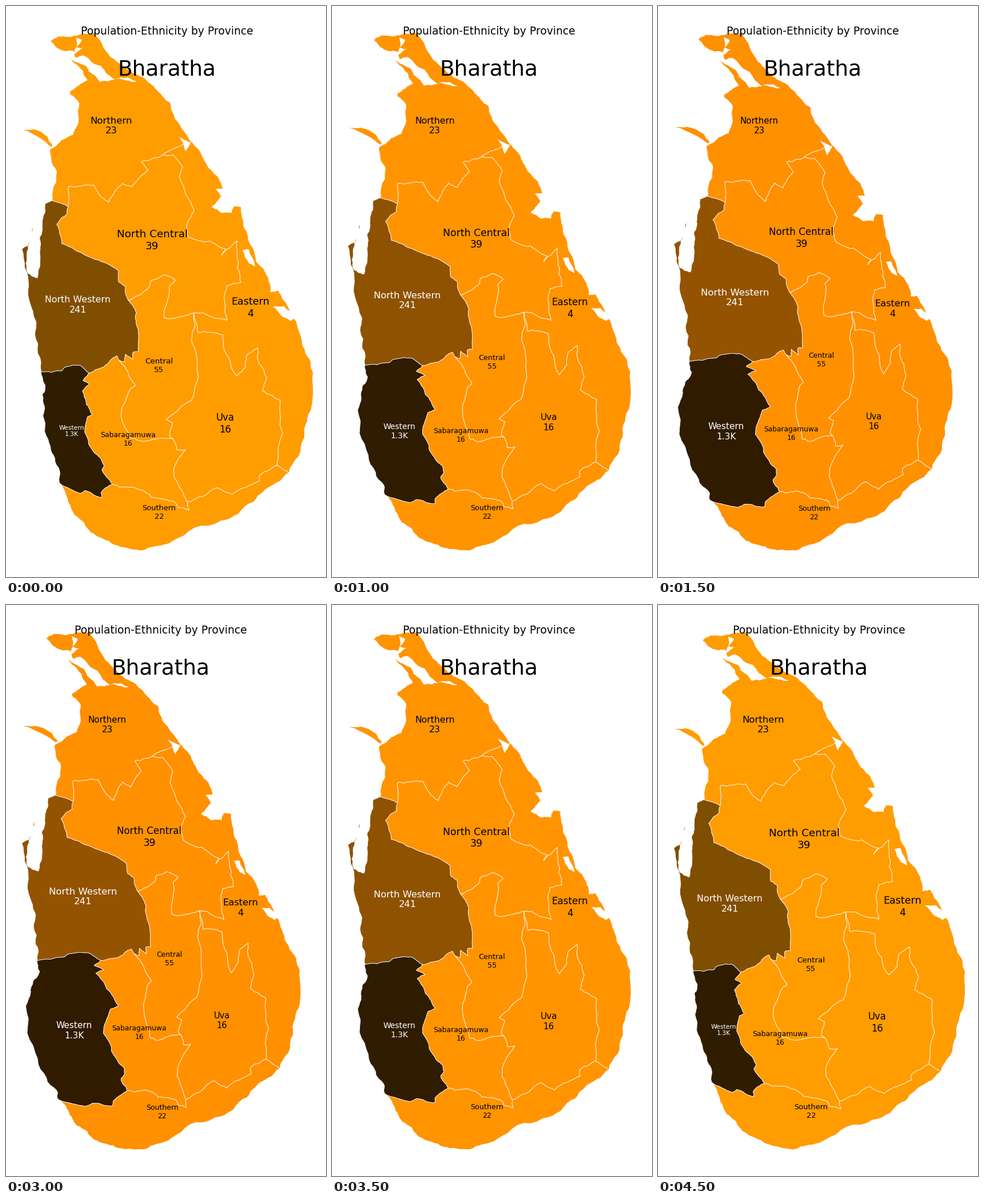
A matplotlib script for the animation above (5 s loop, 560 by 1000 pixels).

```python
import colorsys

import numpy as np
import matplotlib.pyplot as plt
from matplotlib.animation import FuncAnimation

W, H, DPI = 560, 1000, 100
PX = 72 / DPI
LEFT, TOP, BOTTOM = 27.5, 47, 954
STAGES = [0, 1, 2, 3, 4, 4, 3, 2, 1, 0]
rng = np.random.default_rng(4)


def rough(*flat, amount=0.09, levels=3):
    """Line through a few key points, made ragged by shifting midpoints."""
    line = np.array(flat, float).reshape(-1, 2)
    for _ in range(levels):
        a, b = line[:-1], line[1:]
        normal = (b - a)[:, ::-1] * [1, -1]
        out = np.empty((2 * len(line) - 1, 2))
        out[::2] = line
        out[1::2] = (a + b) / 2 + normal * rng.uniform(-amount, amount, (len(a), 1))
        line = out
    return line


def blob(*flat):
    return rough(*flat, *flat[:2], levels=2)


ARCS = {
    # coast
    "n": rough(81,341, 88,308, 88,288, 77,252, 97,235, 117,226, 127,201, 128,171, 112,155,
               113,149, 142,131, 134,114, 112,93, 141,106, 145,115, 164,133, 190,130,
               166,106, 136,88, 122,92, 118,80, 98,79, 78,62, 92,54, 128,51, 155,48,
               183,90, 222,118, 262,146, 287,170, 300,203, 324,238),
    "e": rough(324,238, 342,262, 360,289, 372,302, 379,320, 367,321, 376,334, 360,352,
               376,362, 394,362, 398,350, 411,352, 416,388, 437,447, 458,475, 462,500,
               476,498, 492,525, 508,556, 517,590, 532,622, 534,700, 521,755, 494,816),
    "s": rough(494,816, 470,835, 432,867, 375,900, 290,936, 236,952, 190,942, 148,920,
               120,890, 109,868, 94,834),
    "w": rough(94,834, 94,812, 78,770, 65,716, 68,705, 64,680, 69,665, 62,640),
    "nw": rough(62,640, 51,575, 52,550, 40,490, 28,425, 38,420, 44,407, 37,432, 39,468,
                55,476, 60,446, 59,407, 64,378, 69,346, 81,341),
    # borders
    "nw/n": rough(81,341, 100,347, 109,351),
    "nw/nc": rough(109,351, 107,364, 89,382, 98,416, 130,431, 172,449, 197,464, 197,483,
                   208,490, 214,515),
    "nw/c": rough(214,515, 228,536, 232,575, 232,604, 222,606, 222,618, 209,609, 207,622,
                  198,620),
    "nw/sab": rough(198,620, 194,612, 182,620, 170,632, 145,642),
    "w/nw": rough(62,640, 98,638, 105,631, 128,628, 145,642),
    "w/sab": rough(145,642, 135,655, 146,662, 134,673, 141,697, 151,714, 143,718, 138,745,
                   157,783, 172,803, 168,810, 186,836),
    "w/s": rough(186,836, 167,850, 168,859, 138,847, 130,852, 94,834),
    "n/nc": rough(109,351, 110,316, 154,314, 161,327, 180,344, 204,311, 220,317, 249,288,
                  237,273, 262,266, 274,261),
    "n/e": rough(274,261, 290,251, 324,238),
    "nc/e": rough(274,261, 292,261, 309,283, 303,300, 314,330, 329,359, 315,385, 318,404,
                  356,411, 384,425, 377,436, 404,411, 404,458, 410,484, 386,489, 386,550,
                  345,537, 328,537),
    "nc/c": rough(328,537, 288,547, 276,545, 285,491, 296,480, 276,470, 253,482, 248,495,
                  214,515),
    "sab/c": rough(198,620, 213,640, 226,663, 214,675, 202,705, 217,755, 250,760, 292,757),
    "c/uva": rough(328,537, 324,585, 334,625, 324,690, 280,723, 291,728, 286,752, 292,757),
    "e/uva": rough(328,537, 335,571, 379,575, 383,605, 404,647, 419,632, 420,612, 440,598,
                   442,625, 455,650, 448,673, 479,690, 473,803),
    "e/s": rough(494,816, 473,803),
    "uva/s": rough(473,803, 443,820, 443,830, 395,854, 370,842, 317,867),
    "sab/uva": rough(292,757, 299,776, 314,775, 293,815, 294,825, 317,867),
    "sab/s": rough(317,867, 320,881, 300,876, 296,868, 255,859, 240,847, 186,836),
    # islet, sandbar and lagoons
    "islet": blob(29,217, 48,216, 73,229, 82,244, 80,248, 60,232, 42,222),
    "bar": blob(41,407, 47,386, 44,403),
    "lagoon 1": blob(123,56, 133,60, 122,73, 136,74, 119,85, 124,70),
    "lagoon 2": blob(191,129, 212,126, 229,133, 210,131),
    "lagoon 3": blob(301,228, 323,241, 314,255, 310,242),
    "lagoon 4": blob(413,427, 424,426, 435,456, 424,450),
    "lagoon 5": blob(466,526, 485,525, 505,545, 497,551, 480,541),
    "lagoon 6": blob(58,655, 69,662, 67,677, 60,672),
}

# name, shown value, count, boundary as a walk along arcs ("-" means backwards)
PROVINCES = [
    ("Northern", "23", 23, "n -n/e -n/nc -nw/n"),
    ("North Central", "39", 39, "n/nc nc/e nc/c -nw/nc"),
    ("North Western", "241", 241, "nw nw/n nw/nc nw/c nw/sab -w/nw"),
    ("Eastern", "4", 4, "n/e e e/s -e/uva -nc/e"),
    ("Central", "55", 55, "-nc/c c/uva -sab/c -nw/c"),
    ("Western", "1.3K", 1300, "w/nw w/sab w/s w"),
    ("Sabaragamuwa", "16", 16, "sab/c sab/uva sab/s -w/sab -nw/sab"),
    ("Uva", "16", 16, "e/uva uva/s -sab/uva -c/uva"),
    ("Southern", "22", 22, "s -w/s -sab/s -uva/s -e/s"),
]
COUNTS = np.array([p[2] for p in PROVINCES])


def outline(arcs, walk):
    return np.vstack([arcs[k[1:]][::-1] if k[0] == "-" else arcs[k] for k in walk.split()])


def area_and_centre(poly):
    origin = poly.mean(axis=0)
    p = poly - origin
    q = np.roll(p, -1, axis=0)
    cross = p[:, 0] * q[:, 1] - q[:, 0] * p[:, 1]
    area = cross.sum() / 2
    return abs(area), origin + ((p + q) * cross[:, None]).sum(axis=0) / (6 * area)


def measure(arcs):
    found = [area_and_centre(outline(arcs, p[3])) for p in PROVINCES]
    return np.array([f[0] for f in found]), np.array([f[1] for f in found])


def inflate(arcs):
    """One rubber-sheet cartogram step: areas drift towards the counts."""
    areas, centres = measure(arcs)
    wanted = areas.sum() * COUNTS / COUNTS.sum()
    radius = np.sqrt(areas / np.pi)
    error = np.maximum(areas, wanted) / np.minimum(areas, wanted)
    mass = (np.sqrt(wanted / np.pi) - radius) / (1 + error.mean())

    def push(points):
        offset = points[:, None] - centres
        dist = np.linalg.norm(offset, axis=2)
        rel = dist / radius
        force = mass * np.where(rel > 1, 1 / rel, rel**2 * (4 - 3 * rel))
        return points + (offset * (force / dist)[..., None]).sum(axis=1)

    return {key: push(points) for key, points in arcs.items()}


def fit(arcs):
    """Scale to the fixed height, aligned left."""
    points = np.vstack(list(arcs.values()))
    low = points.min(axis=0)
    scale = (BOTTOM - TOP) / np.ptp(points[:, 1])
    return {key: (p - low) * scale + [LEFT, TOP] for key, p in arcs.items()}


MAPS = [fit(ARCS)]
while len(MAPS) <= max(STAGES):
    MAPS.append(fit(inflate(MAPS[-1])))


def color_of(name, stage):
    t = stage / max(STAGES)
    lightness = {"North Western": 0.25 + 0.05 * t**0.8, "Western": 0.094}.get(name, 0.5)
    return colorsys.hls_to_rgb((36.7 - 3.8 * t) / 360, lightness, 1)


plt.rcParams["font.family"] = "DejaVu Sans"
fig = plt.figure(figsize=(W / DPI, H / DPI), dpi=DPI, facecolor="white")
ax = fig.add_axes([0, 0, 1, 1])
ax.set(xlim=(0, W), ylim=(H, 0))
ax.axis("off")

# patch, walk, province giving the colour
shapes = []
for walk, owner in [("islet", "Northern"), ("bar", "North Western"),
                    *((p[3], p[0]) for p in PROVINCES)]:
    patch, = ax.fill([0], [0], ec="white", lw=0.8 * PX)
    shapes.append((patch, walk, owner))
lagoons = {key: ax.fill([0], [0], fc="white", lw=0, zorder=3)[0]
           for key in ARCS if key.startswith("lagoon")}

labels = [ax.text(0, 0, f"{name}\n{value}", ha="center", va="center", zorder=5,
                  color="white" if name.endswith("Western") else "black")
          for name, value, *_ in PROVINCES]
titles = [ax.text(0, y, text, fontsize=size * PX, ha="center", zorder=5)
          for text, y, size in [("Population-Ethnicity by Province", 49.5, 18.75),
                                ("Bharatha", 121.5, 37.5)]]


def draw(i):
    stage = STAGES[i]
    arcs = MAPS[stage]
    for patch, walk, owner in shapes:
        patch.set_xy(outline(arcs, walk))
        patch.set_facecolor(color_of(owner, stage))
    for key, patch in lagoons.items():
        patch.set_xy(arcs[key])
    areas, centres = measure(arcs)
    for label, area, centre in zip(labels, areas, centres):
        label.set_position(centre)
        label.set_fontsize(0.149 * np.sqrt(area / np.pi) * PX)
    right = max(points[:, 0].max() for points in arcs.values())
    for title in titles:
        title.set_x((LEFT + right) / 2 - 1)
    return []


anim = FuncAnimation(fig, draw, frames=len(STAGES), interval=500, repeat=True, repeat_delay=0)
plt.show()
```
